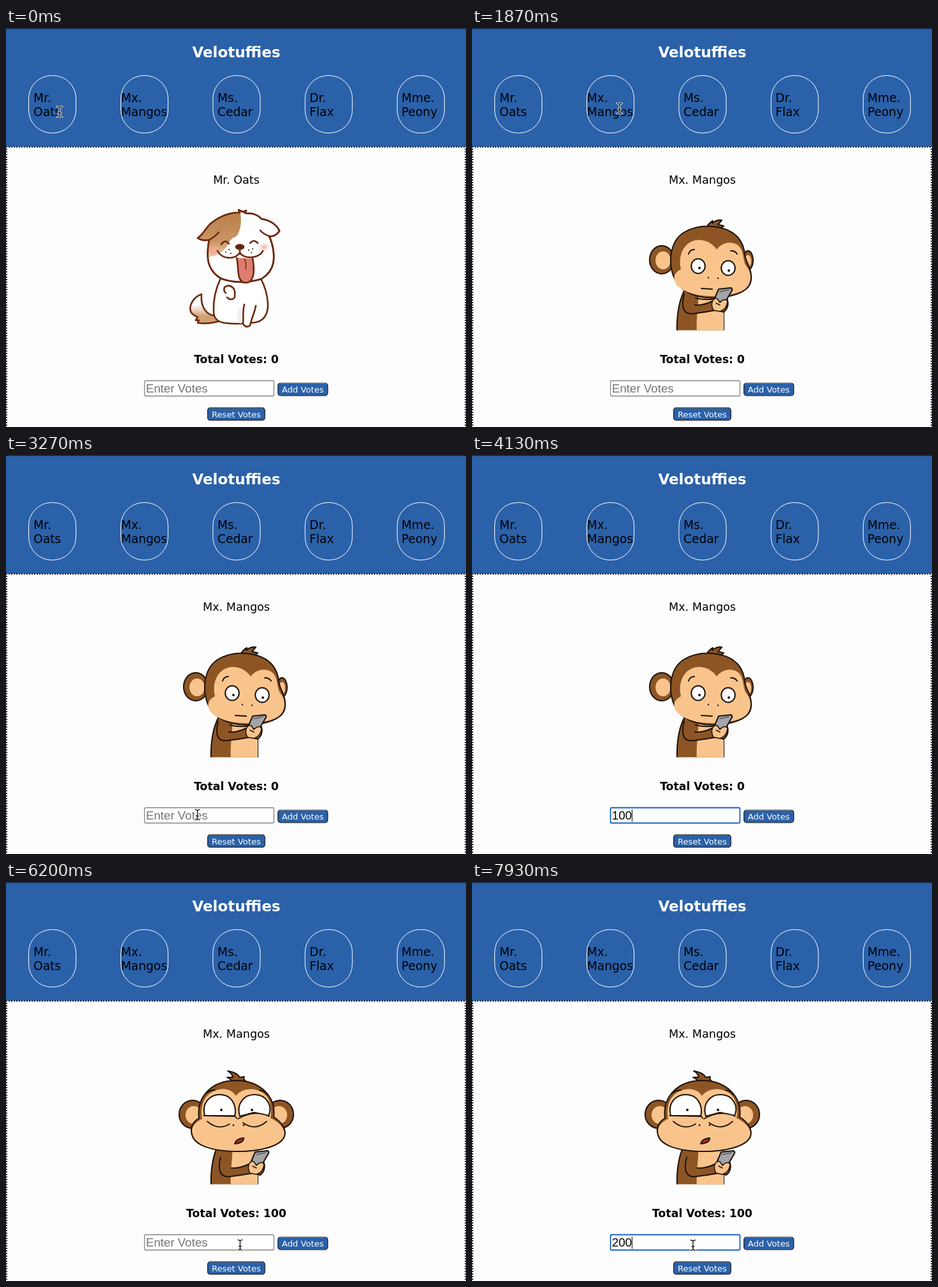
These frames come from a looping animation (720 px wide and 625 px high, 8 s). An HTML page:

```html
<!DOCTYPE html>
<html lang="en">
<head>
<meta charset="utf-8">
<title>Velotuffies</title>
<style>
  html, body { margin: 0; width: 100%; height: 100%; overflow: hidden; background: #fefdfe; }
  svg { display: block; width: 100%; height: 100%; }
  text { font-family: Verdana, "DejaVu Sans", sans-serif; }
  .mid { text-anchor: middle; }
  .card { font-size: 18.6px; }
  .name { font-size: 17.6px; }
  .total { font-size: 17.3px; font-weight: 700; }
  .field { font: 18.7px "Liberation Sans", Arial, sans-serif; }
  .btn { font-size: 13.15px; fill: #fff; }
  .hint { font: 10px Inter, sans-serif; fill: #f4f4f4; }
  .dog { fill: none; stroke: #6b2a10; stroke-width: 2.6; stroke-linecap: round; stroke-linejoin: round; }
  .ape { stroke: #1c120b; stroke-width: 2; stroke-linecap: round; stroke-linejoin: round; }
  .line { fill: none; }
  .fur { fill: #8d5524; }
  .skin { fill: #f9c48c; }
  .bare { stroke: none; }
  .dot { fill: #1c120b; stroke: none; }
</style>
</head>
<body>
<svg id="stage" viewBox="0 0 720 625" preserveAspectRatio="none">
  <defs>
    <linearGradient id="tan" x1="0" y1="0" x2="0" y2="1">
      <stop offset="0" stop-color="#b97f4a"/><stop offset=".65" stop-color="#c99663"/><stop offset="1" stop-color="#edcba8"/>
    </linearGradient>
    <linearGradient id="tailTan" x1="0" y1="0" x2="0" y2="1">
      <stop offset=".35" stop-color="#fff"/><stop offset=".75" stop-color="#d1a273"/>
    </linearGradient>
    <radialGradient id="blush">
      <stop offset="0" stop-color="#f7a99a" stop-opacity=".9"/><stop offset="1" stop-color="#f7a99a" stop-opacity="0"/>
    </radialGradient>
    <clipPath id="photo"><rect x="260" y="270" width="200" height="203.5"/></clipPath>
  </defs>
  <rect width="720" height="625" fill="#fefdfe"/>
  <rect width="720" height="186" fill="#2a61a9"/>
  <rect width="720" height="1.4" fill="#18223c"/>
  <path d="M1 186.5H720M1 190V625M719 190V625" fill="none" stroke="#000" stroke-width="2.2" stroke-linecap="round" stroke-dasharray="0 4"/>
  <text class="mid" x="360.5" y="46" font-size="23" font-weight="700" fill="#fff">Velotuffies</text>
  <g id="cards"></g>
  <text id="name" class="mid name" x="360.5" y="244"></text>
  <g id="pet" clip-path="url(#photo)"></g>
  <text id="total" class="mid total" x="360.5" y="525"></text>
  <rect id="box" x="216.8" y="552.5" width="202.6" height="24" rx="2" fill="#fff"/>
  <text id="field" class="field" x="219" y="571"></text>
  <path id="caret" d="M0 555.5V574.5" stroke="#000"/>
  <g id="buttons"></g>
  <g id="menu">
    <rect x="216.5" y="578" width="203.5" height="60" rx="3" fill="#232325"/>
    <text class="hint" x="225.5" y="601">123</text>
    <text class="hint" x="225.5" y="627">100</text>
  </g>
  <g id="ibeam" fill="none" stroke-linecap="round">
    <path d="M-3.5 -8Q0 -8 0 -5Q0 -8 3.5 -8M0 -5V5M-3.5 8Q0 8 0 5Q0 8 3.5 8M-2 2H2" stroke="#fff" stroke-width="3.2"/>
    <path d="M-3.5 -8Q0 -8 0 -5Q0 -8 3.5 -8M0 -5V5M-3.5 8Q0 8 0 5Q0 8 3.5 8M-2 2H2" stroke="#111" stroke-width="1.3"/>
  </g>
  <path id="arrow" d="M0 0V15.5L3.6 12.2L6 18L8.8 16.8L6.4 11.2H11Z" fill="#000" stroke="#fff" stroke-width="1.2"/>
</svg>
<script>
const LOOP = 8000;
const $ = id => document.getElementById(id);
const p = (d, cls = "line", more = "") => `<path class="${cls}" d="${d}" ${more}/>`;
const oval = (x, y, rx, ry, cls, more = "") =>
  `<ellipse class="${cls}" cx="${x}" cy="${y}" rx="${rx}" ry="${ry}" ${more}/>`;
const dots = (list, r) => list.map(([x, y]) => oval(x, y, r, r, "dot")).join("");

const cards = [
  ["Mr.", "Oats", 43], ["Mx.", "Mangos", 180], ["Ms.", "Cedar", 331],
  ["Dr.", "Flax", 475], ["Mme.", "Peony", 619]
];
$("cards").innerHTML = cards.map(([title, word, x], i) => `
  <rect x="${35.5 + i * 144.2}" y="74.5" width="74" height="90" rx="36" fill="none" stroke="#fff"/>
  <text class="card" x="${x}" y="116">${title}</text>
  <text class="card" x="${x}" y="138">${word}</text>`).join("");

const button = (x, y, w, label) => `
  <rect x="${x}" y="${y}" width="${w}" height="19.4" rx="4" fill="#2a61a9" stroke="#26292e" stroke-width="1.3"/>
  <path d="M${x + 3} ${y}H${x + w - 3}" stroke="#777" stroke-width="1.2"/>
  <text class="btn mid" x="${x + w / 2}" y="${y + 14.6}">${label}</text>`;
$("buttons").innerHTML = button(425.6, 556.4, 78, "Add Votes") + button(315.6, 595, 89.6, "Reset Votes");

function dog(waving) {
  const white = 'fill="#fff"';
  const tail = waving
    ? "M328 451C316 450 304 440 306 417C294 421 286 434 289 444C291 449 296 451 300 453L297 458L302 458L300 462C315 464 326 462 338 458"
    : "M327 443C314 437 307 424 318 405C303 402 292 415 293 427L298 426L295 434L300 434C301 448 314 456 332 455";
  const body = "M336 392C328 409 324 426 325 444C325 455 331 460 342 462Q367 465 391 461C405 458 410 447 410 433C409 417 405 404 399 393";
  const leg = waving
    ? p("M342 406C350 400 360 407 358 418C360 424 352 428 346 422M342 406Q340 412 344 415") +
      p("M373 433C370 444 372 454 371 463Q375 471 382 466C384 455 389 447 391 435", "", white)
    : p("M343 440Q344 453 348 462Q351 470 360 466Q362 460 361 433M373 433Q370 450 372 464Q377 471 383 466Q389 455 391 437");
  const tongue = waving
    ? "M361 359C365 374 360 396 374 398C388 399 390 381 386 360"
    : "M361 357C362 370 359 387 373 387C387 387 388 371 384 353";
  const face = "M322 304C336 293 350 288 366 288L364 284L371 287L376 285L374 289C387 289 393 291 400 298C413 300 424 307 428 317C423 324 417 326 412 325C418 338 421 356 418 368C416 379 409 386 400 392Q368 402 338 392C326 386 317 374 316 360Q315 345 318 331C310 332 304 331 300 328C309 322 314 310 322 304Z";
  const patch = "M322 304C336 293 350 288 367 289Q370 312 361 325Q350 329 346 341Q333 356 317 358Q315 345 318 331C310 332 304 331 300 328C309 322 314 310 322 304Z";
  const head = p(face, "", white) + p(patch, "bare", 'fill="url(#tan)" stroke="none"') +
    oval(327, 348, 12, 9, "", 'fill="url(#blush)" stroke="none"') +
    oval(404, 342, 9, 7, "", 'fill="url(#blush)" stroke="none"') +
    p(face) + p("M318 331Q327 326 333 319M412 325Q403 322 398 316") +
    p("M337 338Q343 329 349 337M382 336Q388 329 394 336") +
    p(tongue, "", 'fill="#dd7e70"') + p("M373 361Q377 367 375 377", "", 'stroke-width="1.5"') +
    p("M331 348C338 361 357 363 366 351C373 362 397 360 402 348M366 345V351") +
    oval(366, 342, 6, 3.4, "", 'fill="#5a210d"') +
    dots([[344, 350], [349, 346], [352, 352], [380, 347], [386, 345], [384, 351]], 1);
  return `<g class="dog">${p(tail, "", 'fill="url(#tailTan)"')}${p(body, "", white)}
    ${oval(367, 450, 6, 13, "", 'fill="#e9e6ea" stroke="none" opacity=".6"')}${leg}
    <g transform="translate(0 ${waving ? 1 : 0})">${head}</g></g>`;
}

const torso = p("M332 412C324 428 320 449 321 478H394V412Z", "fur") +
  p("M353 410C357 428 350 447 352 478H394V412Z", "skin bare");

const hands = (dx, dy) => `<g transform="translate(${dx} ${dy})">` +
  p("M400 434C407 441 406 453 398 459L388 456L391 443Z", "fur") +
  p("M336 431C330 455 337 464 353 461Q370 459 386 456L380 442Q365 449 353 448", "fur") +
  p("M390 423L409 421Q412 422 411 425L401 442L381 444Z", "", 'fill="#a4a5a9"') +
  p("M392 427L406 424", "line", 'stroke="#55575c" stroke-width="1.5"') +
  p("M380 443Q383 436 388 438L392 444Q400 436 404 442Q403 454 392 458L382 456Q378 449 380 443Z", "skin", 'stroke-width="1.5"') +
  p("M386 445L392 448", "line", 'stroke-width="1.4"') + "</g>";

const ear = (x, y, rx, ry, dx) => oval(x, y, rx, ry, "fur") + oval(x + dx, y + 1, rx * .62, ry * .64, "skin bare");

function apeAside() {
  return torso + ear(432, 364, 8, 15, 0) + ear(297, 363, 19, 22, 2) +
    p("M367 315Q369 306 377 302L376 306Q383 300 391 301L385 308L394 310L387 316Z", "fur") +
    p("M321 400C305 374 308 335 332 320C359 304 400 309 417 329Q426 340 427 356C430 370 437 376 437 389C439 409 420 417 398 421C367 426 337 421 321 400Z", "fur") +
    p("M327 378C321 350 337 331 357 332C371 333 379 341 383 347C389 338 404 332 416 340C427 349 423 366 430 374C440 387 437 405 422 412C393 425 338 423 320 402C313 392 317 383 327 378Z", "skin bare") +
    oval(354, 373, 10.8, 11.5, "", 'fill="#fff"') + oval(401, 376, 10.8, 11.5, "", 'fill="#fff"') +
    dots([[356, 376], [402, 380]], 2) + dots([[370, 391], [385, 392]], 1.2) +
    p("M339 354Q341 347 348 347M405 349Q412 349 415 354M359 408L376 409") +
    p("M350 423Q366 427 382 424") + hands(-4, -14);
}

function apeFront(shocked) {
  const hair = shocked
    ? "M350 310L352 300Q356 306 359 305Q358 296 364 287Q363 297 369 301L374 298Q371 305 375 312Z"
    : "M352 313Q354 309 346 306L355 306Q354 300 347 296Q361 298 366 306L373 305Q370 309 378 314Z";
  const eye = x => oval(x, 353, 26, 26, "", 'fill="#fff"');
  const eyes = shocked
    ? eye(334) + eye(388.5) + dots([[336.5, 353], [385.5, 352]], 2)
    : p("M311 366C306 347 318 333 335 333C353 333 362 350 358 367Z", "", 'fill="#fff"') +
      p("M366 367C360 348 372 333 389 333C408 333 418 351 411 366L388 361Z", "", 'fill="#fff"') +
      p("M367 368Q388 357 411 366L408 371Q388 378 367 368Z", "skin bare") +
      p("M309 366H358L361 370M363 371Q388 356 412 367M315 375Q332 390 350 379M371 377Q390 391 408 375", "line", 'stroke-width="1.7"') +
      dots([[337, 357], [385, 357]], 2);
  const spark = p("M408 286Q412 297 419 301L428 302L426 309Q428 317 436 321Q427 323 418 319L417 313L410 309L411 303Q404 299 405 297Z", "", 'fill="#f7c65c"');
  return torso + ear(292, 364, 21, 22, 2) + ear(429, 364, 21, 22, -2) + p(hair, "fur") +
    p("M302 370C298 335 323 311 360 311C397 311 423 335 419 368C433 377 439 389 436 398C431 414 398 422 362 422C324 422 295 413 291 396C288 385 292 376 302 370Z", "fur") +
    p("M307 371C303 347 313 329 333 325C346 322 356 328 360 335C366 327 378 322 393 326C411 331 418 349 414 370C430 377 438 389 435 397C430 413 397 421 362 421C324 421 296 412 292 395C289 383 297 376 307 371Z", "skin bare") +
    eyes + p("M313 331Q319 326 327 326M397 326Q406 328 409 333") +
    dots([[356, 381], [372, 381]], 1.4) +
    p("M358 410Q360 402 372 401Q372 409 358 410Z", "", 'fill="#b52a20"') +
    hands(0, 0) + (shocked ? spark : "");
}

const ape = s => `<g class="ape">${s}</g>`;
const pets = { sit: dog(false), wave: dog(true), aside: ape(apeAside()), tired: ape(apeFront(false)), shocked: ape(apeFront(true)) };

// Value of the last [time, value] step already reached.
const step = (t, list) => list.reduce((v, [at, next]) => t >= at ? next : v, list[0][1]);
const SWAP = 1660, ADDED = 5400;
const poses = [[SWAP, "aside"], [4900, "tired"], [6600, "shocked"], [7500, "tired"]];
const typed = [[0, ""], [3500, "1"], [3650, "10"], [3800, "100"], [ADDED, ""], [7300, "2"], [7480, "20"], [7650, "200"]];
const caretFrom = [[0, null], [3300, 3300], [3800, 3800], [5250, null], [6600, 6600], [7300, 7300], [7650, 7650]];
const caretX = [219.5, 230.4, 240.8, 250.6];
const route = [[0, 84, 131], [250, 84, 131], [900, 231, 126], [2650, 231, 126], [3300, 300, 566],
  [4450, 300, 566], [5150, 450, 567], [5700, 450, 567], [6400, 346, 569], [LOOP, 346, 569]];

function pointer(t) {
  const i = route.findIndex(r => r[0] > t);
  const [t0, x0, y0] = route[i - 1], [t1, x1, y1] = route[i];
  const u = (t - t0) / (t1 - t0), e = u * u * (3 - 2 * u);
  return [x0 + (x1 - x0) * e, y0 + (y1 - y0) * e];
}

const show = (id, on) => $(id).setAttribute("visibility", on ? "visible" : "hidden");
const inside = (x, y, l, t, r, b) => x > l && x < r && y > t && y < b;
let shown;

function draw(t) {
  const pose = t < SWAP ? (Math.floor(t / 215) % 2 ? "sit" : "wave") : step(t, poses);
  if (pose !== shown) $("pet").innerHTML = pets[shown = pose];
  $("name").textContent = t < SWAP ? "Mr. Oats" : "Mx. Mangos";
  $("total").textContent = "Total Votes: " + (t < ADDED ? 0 : 100);

  const value = step(t, typed), since = step(t, caretFrom), focus = since !== null;
  $("field").textContent = value || "Enter Votes";
  $("field").setAttribute("fill", value ? "#000" : "#757575");
  $("box").setAttribute("stroke", focus ? "#1a63c4" : "#858585");
  $("box").setAttribute("stroke-width", focus ? 1.8 : 1.3);
  $("caret").setAttribute("transform", `translate(${caretX[value.length]} 0)`);
  show("caret", focus && (t - since) % 1000 < 500);
  show("menu", t >= 6600 && t < 7300);

  const [x, y] = pointer(t), visible = t < 3500 || t > 4450;
  const overText = inside(x, y, 42, 98, 88, 143) || inside(x, y, 180, 98, 254, 143) || inside(x, y, 217, 552, 420, 577);
  for (const id of ["ibeam", "arrow"]) {
    $(id).setAttribute("transform", `translate(${x} ${y})`);
    show(id, visible && overText === (id === "ibeam"));
  }
}

function tick() {
  draw(performance.now() % LOOP);
  requestAnimationFrame(tick);
}
tick();
</script>
</body>
</html>
```
